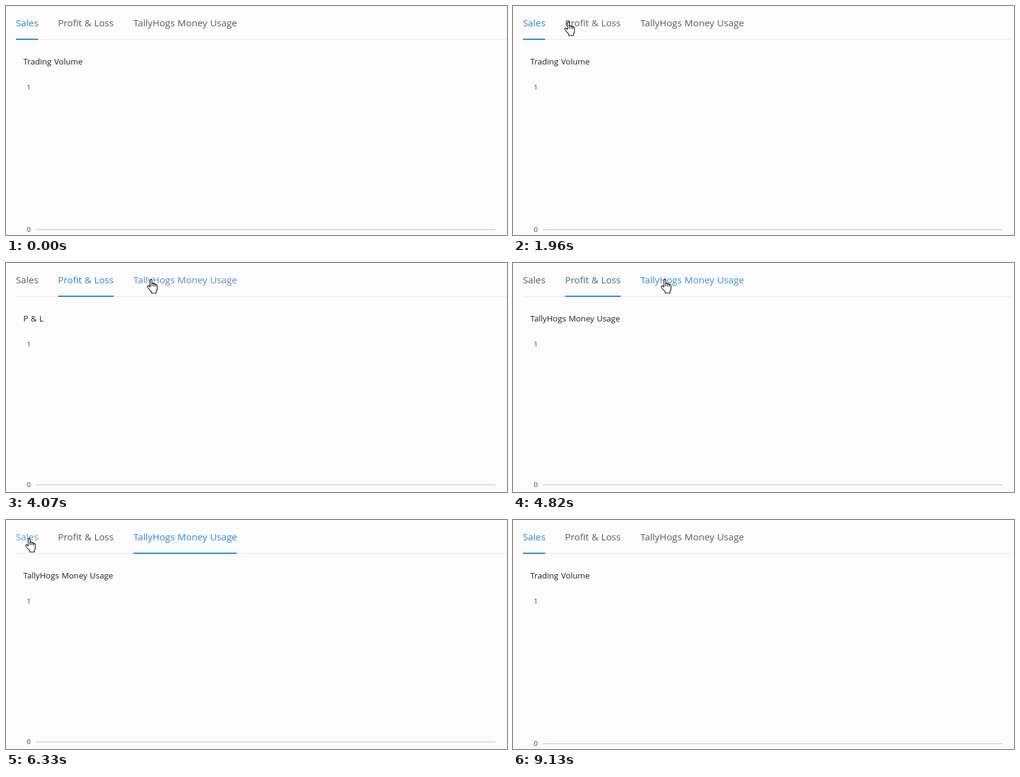
An HTML page that plays this animation: 810x372 px, repeating every 9820 ms.

```html
<!DOCTYPE html>
<html lang="en">
<head>
<meta charset="utf-8">
<title>Report tabs</title>
<style>
  html, body { margin: 0; width: 100%; height: 100%; overflow: hidden; background: #fcfcfc; }
  svg { display: block; font-family: "Open Sans", "Noto Sans", sans-serif; }
  .tab { font-size: 15.2px; word-spacing: .5px; }
  #title { font-size: 13.1px; word-spacing: .8px; fill: #222; }
  .tick { font-size: 11.6px; fill: #424242; text-anchor: end; }
  #arrow, #hand { fill: #fff; stroke: #08080c; stroke-width: 1.1; stroke-linejoin: round; stroke-linecap: round; }
</style>
</head>
<body>
<svg width="810" height="372" viewBox="0 0 810 372">
  <rect x="16" y="54" width="794" height="1" fill="#e8e8e8"/>
  <rect id="bar" y="53" height="2" fill="#2287c9"/>
  <text class="tab" x="16" y="33">Sales</text>
  <text class="tab" x="84" y="33">Profit &amp; Loss</text>
  <text class="tab" x="206" y="33">TallyHogs Money Usage</text>
  <text id="title" x="28" y="95"></text>
  <text class="tick" x="40.2" y="136">1</text>
  <g id="axis">
    <text class="tick" x="40.2" y="367">0</text>
    <rect x="48" y="363" width="743" height="1" fill="#bfbfbf"/>
  </g>
  <g id="cursor">
    <path id="arrow" d="M.5 .5V16.4L4.1 13L6.6 18.8L9 17.8L6.6 12H11.2Z"/>
    <g id="hand" transform="translate(-6 -1)">
      <path d="M5 13V2.2Q5 .6 6.5 .6T8 2.2V7.6Q8.4 6.5 9.6 6.7T11 8.2Q11.4 7.3 12.5 7.6T13.8 9.2Q14.3 8.6 15.2 9T16.4 10.6V16Q16.4 18.6 14.8 20.3V23H7.2V20.8L1.2 14Q.2 12.4 1.3 11.5T3.5 11.8Z"/>
      <path d="M8 7.6V11.4M11 8.2V11.6M13.8 9.2V12" fill="none"/>
    </g>
  </g>
</svg>
<script>
const LOOP = 9820, FADE = 300;
const $ = id => document.getElementById(id);
const tabs = [...document.querySelectorAll('.tab')];
const GRAY = [92, 92, 92], HOVER = [86, 157, 224], ACTIVE = [46, 135, 216];

const sales = { x: 16, w: 36, title: 'Trading Volume', shift: 0 };
const profit = { x: 84, w: 90, title: 'P & L', shift: -3 };
const usage = { x: 206, w: 167, title: 'TallyHogs Money Usage', shift: -3 };
const views = [sales, profit, usage];

// content switches at the click, the ink bar follows after a lag
const clicks = [
  { at: 0, lag: 0, from: sales, to: sales },
  { at: 2470, lag: 180, from: sales, to: profit },
  { at: 4640, lag: 160, from: profit, to: usage },
  { at: 6880, lag: 280, from: usage, to: sales }
];

// pointer tip: in from the left edge, along the tabs, back and out
const enter = { x: 0, y: 31 }, onProfit = { x: 113, y: 25 };
const onUsage = { x: 245, y: 27 }, onSales = { x: 37, y: 30 }, leave = { x: 1, y: 40 };
const moves = [
  { at: 1420, end: 2360, from: enter, to: onProfit },
  { at: 3440, end: 4290, from: onProfit, to: onUsage },
  { at: 5490, end: 6180, from: onUsage, to: onSales },
  { at: 8070, end: 8160, from: onSales, to: leave }
];

const clamp = v => Math.min(1, Math.max(0, v));
const mix = (a, b, k) => a + (b - a) * k;
const easeInOut = k => k < .5 ? 4 * k ** 3 : 1 - (2 - 2 * k) ** 3 / 2;
const easeOut = k => 1 - (1 - k) ** 1.8;
const current = (list, t) => list.findLast(step => step.at <= t);

function pointer(t) {
  const move = current(moves, t);
  if (!move || (move.to === leave && t >= move.end)) return null;
  const k = easeOut(clamp((t - move.at) / (move.end - move.at)));
  const x = Math.round(mix(move.from.x, move.to.x, k));
  const y = Math.round(mix(move.from.y, move.to.y, k));
  const busy = move.to === onProfit && t >= 2500;
  const over = views.find(v => x >= v.x && x < v.x + v.w);
  return { x, y, over: busy ? null : over };
}

function targetColor(view, t) {
  if (current(clicks, t).to === view) return ACTIVE;
  return pointer(t)?.over === view ? HOVER : GRAY;
}

// a moving average over the last FADE ms gives the colour transition
function tabColor(view, t) {
  const samples = 12, sum = [0, 0, 0];
  for (let i = 0; i < samples; i++) {
    const past = (t - FADE * i / samples + LOOP) % LOOP;
    targetColor(view, past).forEach((c, n) => sum[n] += c);
  }
  return `rgb(${sum.map(c => Math.round(c / samples))})`;
}

function drawCursor(t) {
  const p = pointer(t);
  $('cursor').style.display = p ? '' : 'none';
  if (!p) return;
  $('cursor').setAttribute('transform', `translate(${p.x} ${p.y})`);
  $('hand').style.display = p.over ? '' : 'none';
  $('arrow').style.display = p.over ? 'none' : '';
}

function draw(t) {
  const { at, lag, from, to } = current(clicks, t);
  $('title').textContent = to.title;
  $('axis').setAttribute('transform', `translate(0 ${to.shift})`);
  const k = easeInOut(clamp((t - at - lag) / FADE));
  $('bar').setAttribute('x', mix(from.x, to.x, k));
  $('bar').setAttribute('width', mix(from.w, to.w, k));
  tabs.forEach((tab, i) => tab.setAttribute('fill', tabColor(views[i], t)));
  drawCursor(t);
}

const begin = performance.now();
function tick() {
  draw((performance.now() - begin) % LOOP);
  requestAnimationFrame(tick);
}
tick();
</script>
</body>
</html>
```
